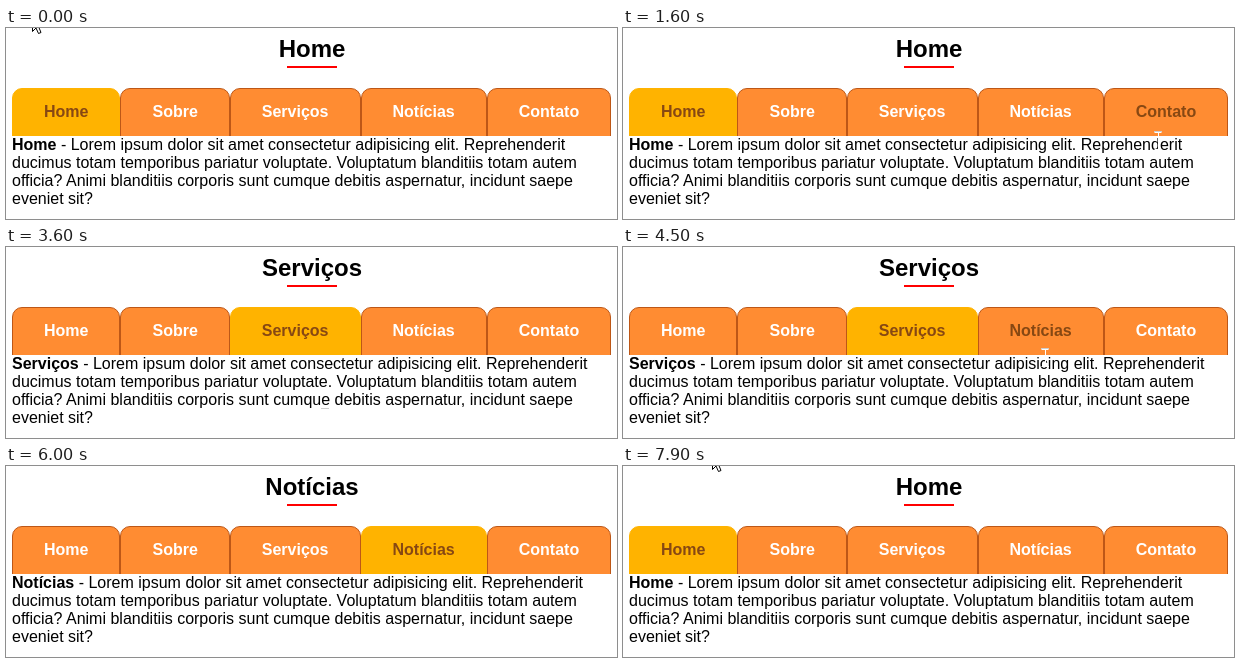
These frames come from a looping animation (611 by 191 pixels, 8000 ms). An HTML page:

```html
<!DOCTYPE html>
<html lang="pt">
<head>
<meta charset="utf-8">
<title>Abas</title>
<style>
html, body { margin: 0; width: 611px; height: 191px; overflow: hidden; background: #fff; }
svg { display: block; font: 16px "Liberation Sans", Arial, sans-serif; }
text { white-space: pre; }
.bold { font-weight: bold; }
</style>
</head>
<body>
<svg width="611" height="191" viewBox="0 0 611 191">
  <rect width="611" height="191" fill="#fff"/>
  <text id="title" class="bold" x="306" y="29" font-size="24" text-anchor="middle"></text>
  <rect x="281" y="38" width="50" height="2" fill="#f00"/>
  <g id="tabs"></g>
  <text x="6" y="122"><tspan id="lead" class="bold"></tspan> - Lorem ipsum dolor sit amet consectetur adipisicing elit. Reprehenderit</text>
  <text x="6" y="140">ducimus totam temporibus pariatur voluptate. Voluptatum blanditiis totam autem</text>
  <text x="6" y="158">officia? Animi blanditiis corporis sunt cumque debitis aspernatur, incidunt saepe</text>
  <text x="6" y="176">eveniet sit?</text>
  <g id="pointer">
    <path id="arrow" fill="#fff" stroke="#000" d="M.5 .5V16.5L4 13L6.5 18.5L9 17.5L6.7 12H11.5Z"/>
    <g id="hand" fill="#fff" stroke="#000" stroke-linejoin="round">
      <path d="M-2 14V1.8Q-2 0 -.2 0T1.6 1.8V8Q3 6.2 4.2 8.4Q5.6 7 6.7 9.2Q9 8.4 9 11.2V16Q9 18 7.3 20V22.5H-2V21L-7 14.5Q-8.2 12.2 -6 11.5T-2 14.5"/>
      <path fill="none" d="M1.6 8V12M4.2 8.5V12M6.7 9.2V12.5"/>
    </g>
    <g id="beam" fill="none">
      <path stroke="#ccc" d="M-4 -9.5H4"/>
      <path stroke="#fff" d="M-3.5 -8.5H3.5M.5 -8.5V8.5M-3.5 8.5H4"/>
    </g>
  </g>
</svg>
<script>
const LOOP = 8000, STEP = 100, FADE = 200;
const TOP = 60, BOTTOM = 108, PAD = 32, RADIUS = 9.5;
const names = ["Home", "Sobre", "Serviços", "Notícias", "Contato"];
const opens = [0, 2400, 3500, 4800, 6200, 7400];

// pointer rests: arrival, departure, x, y, depth of the swing on the way there
const rests = [
  [0, 0, 26, -13],
  [900, 900, 300, 84, 55],
  [1400, 1500, 522, 83],
  [1600, 1600, 535, 113],
  [2100, 2300, 172, 92, 45],
  [3000, 3300, 280, 93, 66],
  [4300, 4400, 411, 84, 100],
  [5400, 5700, 517, 90, 85],
  [6000, 6400, 515, 210],
  [6500, 6500, 14, 148],
  [6600, 6900, 36, 87],
  [7400, 7500, 78, -9],
  [7900, LOOP, 89, -13]
];

const $ = id => document.getElementById(id);

function add(tag, attrs) {
  const el = document.createElementNS("http://www.w3.org/2000/svg", tag);
  for (const k in attrs) el.setAttribute(k, attrs[k]);
  return $("tabs").appendChild(el);
}

// each tab is as wide as its label plus padding
let edge = 6;
const tabs = names.map(name => {
  const shape = add("path", {});
  const label = add("text", { class: "bold", y: 89 });
  label.textContent = name;
  const left = Math.round(edge);
  label.setAttribute("x", edge + PAD);
  edge += label.getComputedTextLength() + 2 * PAD;
  const right = Math.round(edge);
  const arc = (x, y) => `A${RADIUS} ${RADIUS} 0 0 1 ${x} ${y}`;
  const l = left + .5, r = right - .5, y = TOP + .5;
  shape.setAttribute("d", `M${l} ${BOTTOM}V${y + RADIUS}${arc(l + RADIUS, y)}H${r - RADIUS}${arc(r, y + RADIUS)}V${BOTTOM}`);
  return { shape, label, left, right };
});

function pointerAt(t) {
  const i = rests.findIndex(r => r[1] >= t);
  const [arrive, , x, y, swing = 0] = rests[i];
  if (t >= arrive) return [x, y];
  const [, leave, x0, y0] = rests[i - 1];
  const k = (t - leave) / (arrive - leave);
  return [x0 + (x - x0) * k, y0 + (y - y0) * k + swing * Math.sin(Math.PI * k)];
}

function tabAt([x, y]) {
  return y < TOP || y >= BOTTOM ? -1 : tabs.findIndex(b => x >= b.left && x < b.right);
}

function hoverLevel(tab, t) {
  let level = 0;
  for (let s = 0; s < t; s += STEP) {
    const change = (tabAt(pointerAt(s)) === tab ? 1 : -1) * STEP / FADE;
    level = Math.min(1, Math.max(0, level + change));
  }
  return level;
}

function mix(a, b, k) {
  return `rgb(${a.map((v, i) => Math.round(v + (b[i] - v) * k))})`;
}

function draw(now) {
  const t = Math.floor(now % LOOP / STEP) * STEP;
  const active = (opens.filter(o => o <= t).length - 1) % names.length;
  $("title").textContent = $("lead").textContent = names[active];
  tabs.forEach(({ shape, label }, i) => {
    const on = i === active;
    shape.setAttribute("fill", on ? "#ffb300" : "#ff8c32");
    shape.setAttribute("stroke", on ? "#ffb300" : "#bd5717");
    label.setAttribute("fill", mix([255, 255, 255], [135, 72, 19], on ? 1 : hoverLevel(i, t)));
  });
  const spot = pointerAt(t), [x, y] = spot.map(Math.round);
  const kind = tabAt(spot) >= 0 ? "hand" : y >= BOTTOM && y < 182 ? "beam" : "arrow";
  for (const id of ["arrow", "hand", "beam"]) $(id).style.display = id === kind ? "" : "none";
  $("pointer").setAttribute("transform", `translate(${x} ${y})`);
}

const start = performance.now();
function tick() {
  draw(performance.now() - start);
  requestAnimationFrame(tick);
}
tick();
</script>
</body>
</html>
```
